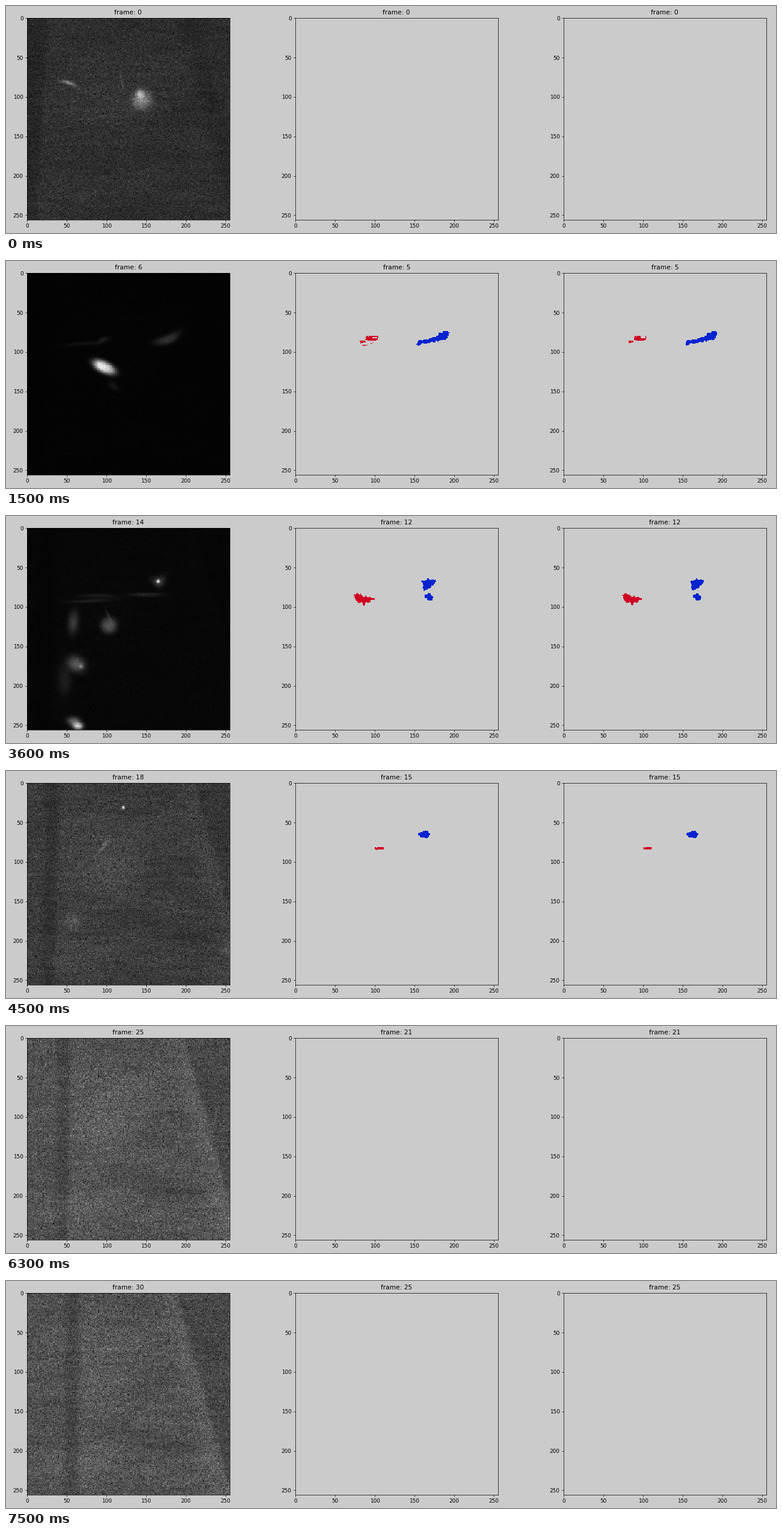
These frames come from a looping animation (1280x379 px, 7.8 s). A matplotlib script:

```python
import numpy as np
import matplotlib.pyplot as plt
from matplotlib.animation import FuncAnimation
from matplotlib.path import Path

WIDTH, HEIGHT, DPI = 1280, 379, 64
STEPS, INTERVAL = 26, 300
N = 256
BACKDROP = "#cbcbcb"
RED, BLUE = "#d10025", "#0223cf"

plt.rcParams["font.family"] = "DejaVu Sans"
Y, X = np.mgrid[0:N, 0:N].astype(float)


def smooth_noise(seed, sx, sy):
    """Periodic Gaussian-filtered noise with unit deviation."""
    white = np.random.default_rng(seed).normal(size=(N, N))
    fx, fy = np.meshgrid(np.fft.fftfreq(N), np.fft.fftfreq(N))
    low_pass = np.exp(-2 * np.pi**2 * ((fx * sx) ** 2 + (fy * sy) ** 2))
    field = np.fft.ifft2(np.fft.fft2(white) * low_pass).real
    return field / field.std()


RIPPLE = smooth_noise(3, 14, 1.4)
CLOUD = smooth_noise(8, 26, 10)


def keyed(step, steps, rows):
    """Interpolate one row of values between key steps."""
    return [np.interp(step, steps, column) for column in zip(*rows)]


def glow(x, y, sx, sy, degrees, amp, bend=0.0, power=1.0):
    a = np.radians(degrees)
    u = ((X - x) * np.cos(a) + (Y - y) * np.sin(a)) / sx
    v = ((Y - y) * np.cos(a) - (X - x) * np.sin(a)) / sy - bend * u**2
    return amp * np.exp(-((u * u + v * v) / 2) ** power)


# Each glow: x, y, length, width, degrees, brightness
BODY = [(145, 104, 8, 9, 60, 72), (97, 119, 10.5, 5, 26, 215),
        (103, 123, 7, 7, 40, 72), (103, 121, 7, 7, 40, 0)]
STREAK = [(52, 81.5, 7, 1.6, 16, 85), (95, 84, 5, 2, -25, 24),
          (88, 85, 16, 1.5, 0, 20), (95, 82, 10, 1, -10, 0)]
NEURON = [(180, 82, 12, 4, -20, 0), (177, 84, 12, 4, -21, 42),
          (166, 68, 6, 5, -10, 48), (162, 65, 5, 3, 0, 0)]

START = [(142, 96, 3.5, 4, 0, 85), (119.5, 82, 9, .8, 79, 28)]
EARLY = [(90, 116, 4, 4, 0, 30), (72, 89, 16, 1.6, -3, 13),
         (109, 143, 6, 3, 40, 16)]
MIDDLE = [(165, 67, 1.6, 1.6, 0, 175), (58, 119, 4.5, 10, 5, 50),
          (62, 172, 8, 6.5, 35, 80), (68, 175, 2, 2, 0, 65),
          (59, 245, 6, 4, 10, 95), (64, 251, 4.5, 3, 0, 170),
          (47, 192, 6, 14, 0, 22), (150, 84, 15, 1.7, 0, 28),
          (80, 92, 20, 1.5, -3, 22), (102, 110, 6, 1, 65, 25)]
LATE = [(121, 31, 1.3, 1.3, 0, 165), (97, 78, 8, 1.4, -57, 40),
        (58, 175, 7, 7, 35, 26)]


def cells(step):
    light = np.zeros((N, N))
    for rows, bend, power in ((BODY, 0, 1.5), (STREAK, .35, 1), (NEURON, -.3, 1.3)):
        light += glow(*keyed(step, (0, 5, 12, 14), rows), bend, power)
    for group, peak, reach in ((START, 0, 3), (EARLY, 5, 4), (MIDDLE, 12, 3), (LATE, 15, 1.5)):
        strength = max(0, 1 - abs(step - peak) / reach)
        if strength:
            for *place, amp in group:
                light += glow(*place, amp * strength, 0, 1.15)
    return light


def sigmoid(z):
    return 1 / (1 + np.exp(-np.clip(z, -40, 40)))


# left edge, its width, its lean, right edge, strip gain, outer gain, haze
TISSUE = [(26, 40, -14, 214, -.15, -.03, .16),
          (42, 15, -7, 211, .15, -.1, .22),
          (66, 17, -2, 189, .12, -.13, .06)]


def tissue(step):
    edge, width, lean, right, strip, outer, haze = keyed(step, (0, 16, 25), TISSUE)
    left = edge + lean * Y / N - X
    side = X - right - .27 * Y
    gain = 1 - .17 * sigmoid(left / 1.5) * sigmoid((width - left) / 2)
    gain += .07 * sigmoid(-left / 3) * np.exp(-np.maximum(-left, 0) / 35)
    gain += strip * sigmoid(-side / 1.5) * sigmoid((side + 22) / 4)
    gain += outer * sigmoid(side / 1.5)
    gain += glow(100, 108, 32, 26, 0, haze)
    if step > 13:
        drift = 3 * (step - 17)
        gain += glow(204 - drift, 191, 30, 8, 0, -.13)
        gain += glow(247 - drift, 206, 10, 6, 0, .13)
        gain += glow(70, 235, 22, 25, 0, .09)
    shift = -2 * step
    return gain + .035 * np.roll(RIPPLE, shift, 1) + .025 * np.roll(CLOUD, shift, 1)


def microscope(step):
    level = np.interp(step, (0, 1, 3, 5, 12, 14, 15, 17, 21),
                      (46, 27, 9, 4, 7, 27, 59, 90, 81))
    grain = np.random.default_rng(100 + step).normal(size=(N, N))
    image = level * tissue(step) * (1 + .23 * grain)
    image += cells(step) * (1 + .06 * grain)
    return np.clip(image, 0, 255)


# Outlines at three key steps, with matching corners
RED_SHAPES = [
    [(80, 86), (92, 79), (104, 79.5), (104, 83.5), (96, 89), (84, 91.5)],
    [(73, 83), (82, 83), (87, 86.5), (100, 89), (87, 97), (76, 92)],
    [(99.5, 80.5), (110, 80.5), (115.5, 78.5), (112, 80), (112, 83.5), (99.5, 83.5)]]
BLUE_SHAPES = [
    [(153.5, 87.5), (178, 79.5), (188, 73), (195, 74), (190, 84), (154, 91.5)],
    [(160, 66), (167, 63.5), (176.5, 65), (175, 72), (163, 78.5), (160, 73)],
    [(153, 64.5), (161, 60.5), (167, 60.5), (169.5, 65), (167, 69), (159, 69)]]


def shape_at(step, shapes):
    held = 12 if 12 <= step < 15 else step
    rows = [np.ravel(points) for points in shapes]
    return np.reshape(keyed(held, (5, 12, 15), rows), (-1, 2))


def fill(points, wobble):
    samples = np.column_stack([(X + wobble[0]).ravel(), (Y + wobble[1]).ravel()])
    return Path(points).contains_points(samples).reshape(N, N)


def segment(step):
    """Red and blue masks of the tracked cells."""
    if not 1 <= step <= 15:
        return np.zeros((2, N, N), bool)
    rough = .7 if step < 15 else .25
    wobble = [rough * smooth_noise(300 + 2 * step + i, 1, 1) for i in range(2)]
    red = fill(shape_at(step, RED_SHAPES), wobble)
    red &= smooth_noise(400 + step, 2.2, .9) < np.interp(step, (5, 8, 12), (.25, 1.2, 5))
    blue = fill(shape_at(step, BLUE_SHAPES), wobble)
    if 10 <= step <= 13:
        blue |= np.hypot((X + wobble[0] - 168) / 5.3, (Y + wobble[1] - 87) / 4.5) < 1
    return red, blue


def refine(mask):
    """Drop pixels that have few set neighbours."""
    count = sum(np.roll(mask.astype(int), (dy, dx), (0, 1))
                for dy in (-1, 0, 1) for dx in (-1, 0, 1))
    return mask & (count >= 5)


def paint(masks):
    rgba = np.zeros((N, N, 4))
    for mask, colour in zip(masks, (RED, BLUE)):
        rgba[mask] = plt.matplotlib.colors.to_rgba(colour)
    return rgba


fig = plt.figure(figsize=(WIDTH / DPI, HEIGHT / DPI), dpi=DPI, facecolor=BACKDROP)


def panel(left):
    size = 337
    ax = fig.add_axes([left / WIDTH, (HEIGHT - 356.7) / HEIGHT,
                       size / WIDTH, size / HEIGHT], facecolor=BACKDROP)
    ax.set_xticks(range(0, N, 50))
    ax.set_yticks(range(0, N, 50))
    picture = ax.imshow(np.zeros((N, N, 4)), interpolation="nearest",
                        aspect="auto", cmap="gray", vmin=0, vmax=255)
    return picture, ax.set_title("frame: 0", fontsize=12)


(raw, raw_title), (first, first_title), (second, second_title) = [
    panel(34.8 + 446 * i) for i in range(3)]


def update(step):
    raw.set_data(microscope(step))
    masks = segment(step)
    first.set_data(paint(masks))
    second.set_data(paint([refine(mask) for mask in masks]))
    raw_title.set_text(f"frame: {step * 6 // 5}")
    for title in (first_title, second_title):
        title.set_text(f"frame: {step}")
    return raw, first, second, raw_title, first_title, second_title


anim = FuncAnimation(fig, update, frames=STEPS, interval=INTERVAL,
                     repeat=True, repeat_delay=0, blit=False)
plt.show()
```
